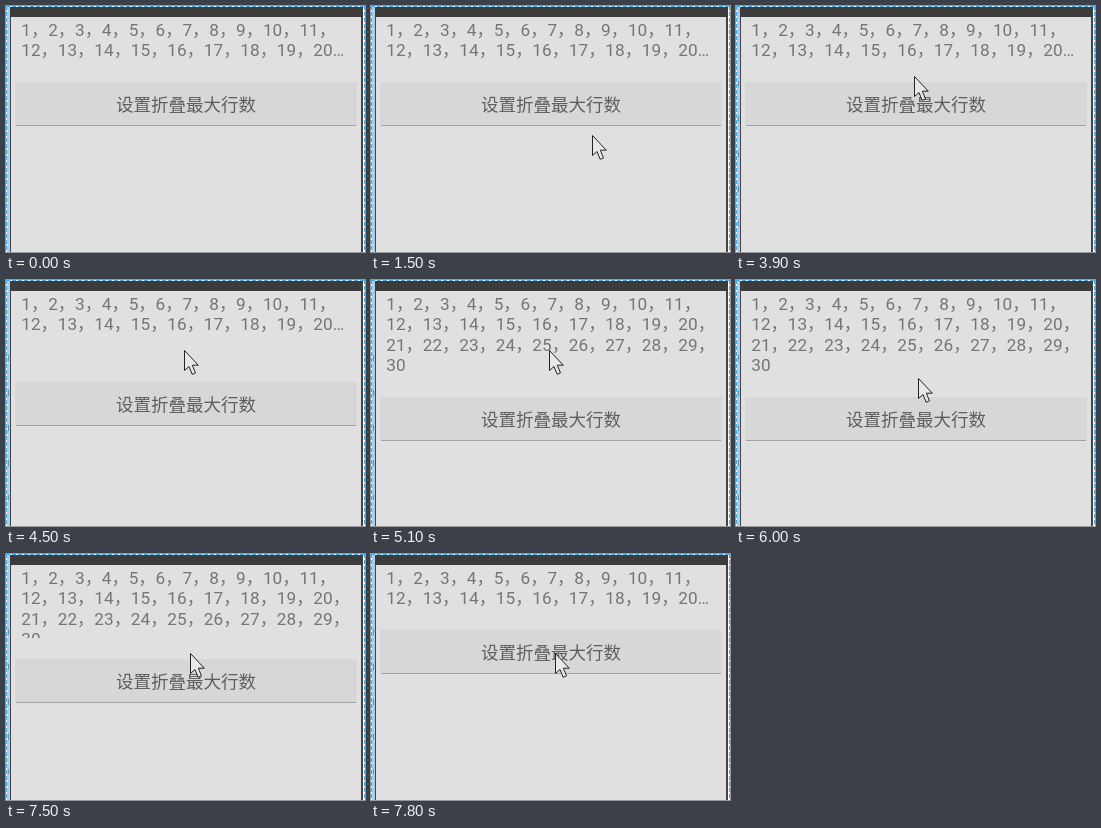
Recreate the animation shown at these times as an HTML page. Size 359 by 246 pixels, loop 8000 ms.

```html
<!DOCTYPE html>
<html lang="zh-CN">
<head>
<meta charset="utf-8">
<style>
  html, body { margin: 0; width: 100%; height: 100%; overflow: hidden; }
  svg { display: block; }
  text { font: 17.2px Roboto, "Noto Sans CJK SC", "Noto Sans CJK", sans-serif; fill: #757575; white-space: pre; }
  #label { font-size: 17.5px; font-weight: 500; fill: #5e5e5e; text-anchor: middle; }
</style>
</head>
<body>
<svg width="359" height="246" viewBox="0 0 359 246">
  <defs><clipPath id="clip"><rect id="view" width="359" height="55"/></clipPath></defs>
  <rect width="359" height="246" fill="#fff"/>
  <rect x="1" y="1" width="3" height="245" fill="#a5d0f2"/>
  <rect x="4" y="1" width="353" height="245" fill="#e0e0e0"/>
  <path d="M4 1H357V11H4z" fill="#3c3c3c"/>
  <path d="M4 11H5V246H4zM355 11H357V246H355z" fill="#444"/>
  <path d="M.5 0V246M0 .5H359M358.5 0V246" stroke="#45a9e8" stroke-dasharray="4 2" fill="none"/>
  <path id="marks" d="M2.5 75V220" stroke="#5f93b8" stroke-dasharray="6 29"/>
  <g id="lines" clip-path="url(#clip)"></g>
  <g id="button">
    <rect x="9" y="76" width="342" height="43" fill="#d7d7d7"/>
    <path d="M10 119.5H350" stroke="#a3a3a3"/>
    <text id="label" x="180" y="105">设置折叠最大行数</text>
  </g>
  <path id="cursor" d="M.5 .5V20.5L5 16.5L8.2 24.3L11.5 22.9L8.3 15.2H14.3z" fill="#e8e8e8" stroke="#222"/>
</svg>
<script>
const $ = id => document.getElementById(id);
const LOOP = 8000, STEP = 300, GROWTH = 41;

// Key points of the pointer's path: time, x, y
const path = [
  [1500, 221, 129], [1800, 171, 118], [2400, 165, 111], [3300, 178, 70],
  [5100, 178, 70], [5700, 183, 96], [6600, 181, 101], [7200, 184, 99]
];

const progress = (t, from, to) => Math.min(1, Math.max(0, (t - from) / (to - from)));
const easeOut = (p, power) => 1 - (1 - p) ** power;

function pointerAt(t) {
  const next = path.findIndex(key => key[0] > t);
  if (next < 0) return path.at(-1).slice(1);
  const [t0, x0, y0] = path[next - 1], [t1, x1, y1] = path[next];
  const p = easeOut(progress(t, t0, t1), 1.5);
  return [x0 + (x1 - x0) * p, y0 + (y1 - y0) * p].map(Math.round);
}

// The text area opens quickly, then closes with a slow start.
function growthAt(t) {
  const open = easeOut(progress(t, 4200, 5100), 2.55);
  const close = Math.cos(progress(t, 7200, 7800) * Math.PI / 2);
  return Math.round(GROWTH * open * close);
}

const range = (from, to) =>
  Array.from({ length: to - from + 1 }, (_, i) => from + i + (from + i < 30 ? '，' : '')).join('');
const full = [range(1, 11), range(12, 20), range(21, 29), '30'];
const folded = [full[0], full[1].slice(0, -1) + '…'];

const rows = full.map((_, i) => {
  const row = document.createElementNS('http://www.w3.org/2000/svg', 'text');
  row.setAttribute('x', 15.3);
  row.setAttribute('y', 30 + 20.4 * i);
  return $('lines').appendChild(row);
});

const show = (id, on) => $(id).style.display = on ? '' : 'none';
const move = (id, x, y) => $(id).setAttribute('transform', `translate(${x} ${y})`);

function draw(now) {
  const t = Math.floor(now % LOOP / STEP) * STEP;
  const extra = growthAt(t);
  const text = t >= 5100 && t < 7800 ? full : folded;
  const pointing = t >= path[0][0];

  rows.forEach((row, i) => row.textContent = text[i] || '');
  $('view').setAttribute('height', 55 + extra);
  move('button', 0, extra);
  show('marks', t >= 3600);
  show('cursor', pointing);
  if (pointing) move('cursor', ...pointerAt(t));
  requestAnimationFrame(draw);
}
draw(performance.now());
</script>
</body>
</html>
```
